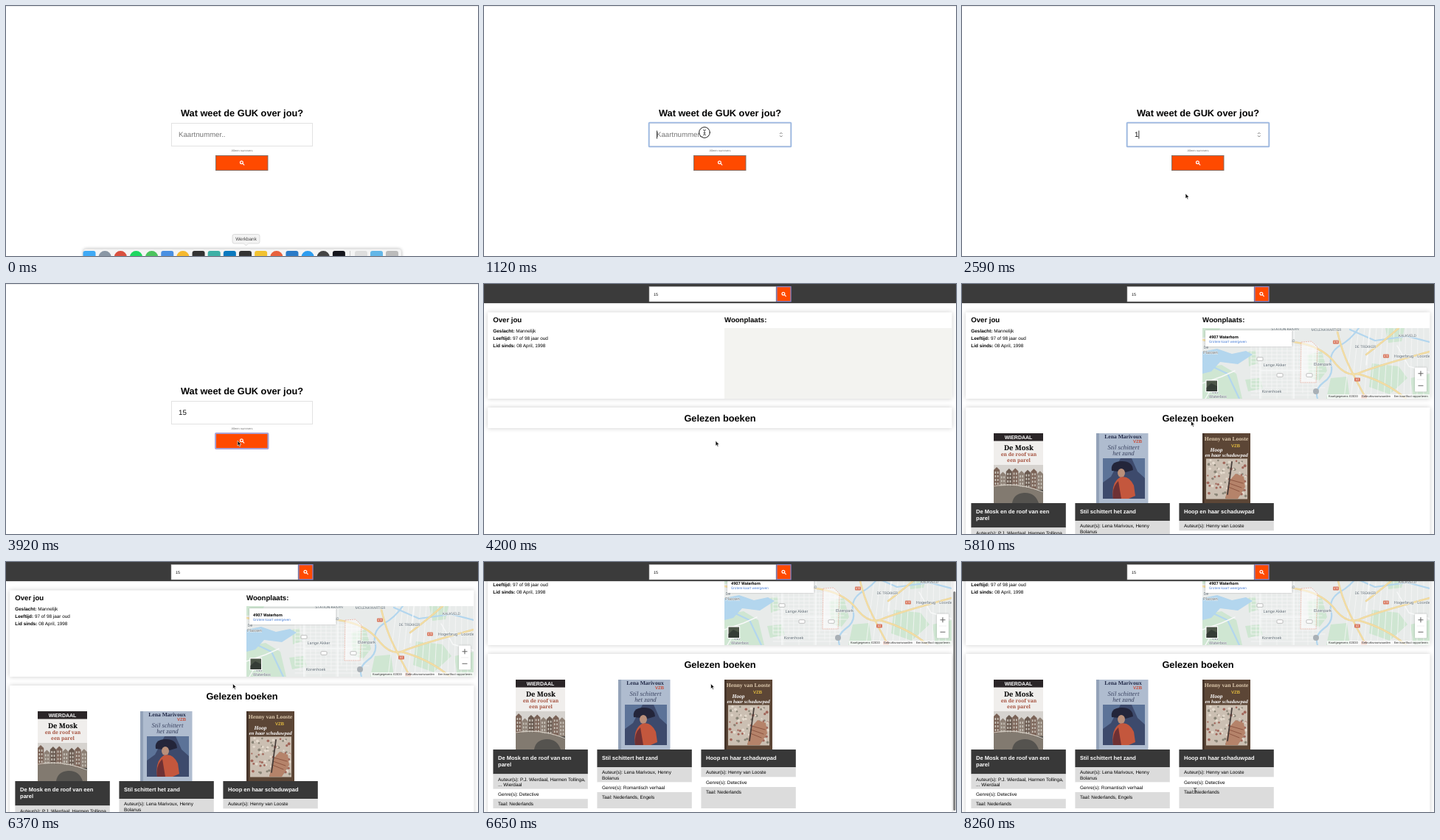
Recreate the animation shown at these times as an HTML page. Size 640 by 340 pixels, loop 8.33 s.

```html
<!DOCTYPE html>
<html lang="nl">
<head>
<meta charset="utf-8">
<title>Wat weet de GUK over jou?</title>
<style>
html, body { margin: 0; height: 100%; overflow: hidden; background: #fff; }
svg { display: block; }
#stage { width: 100vw; height: 100vh; }
text { font: 6.4px "Liberation Sans", Arial, sans-serif; white-space: pre; text-rendering: geometricPrecision; }
.b { font-weight: bold; }
.h1 { font-size: 12.75px; font-weight: bold; text-anchor: middle; }
.h2 { font-size: 9.6px; font-weight: bold; }
.field { font-size: 9.7px; }
.title { font-size: 7.5px; font-weight: bold; fill: #fff; }
.tiny { font-size: 4px; fill: #777; }
.mid { text-anchor: middle; }
.card { fill: #fff; filter: drop-shadow(0 0 3px #0003); }
.cover text { font-family: "Liberation Serif", Times, serif; font-weight: bold; text-anchor: middle; }
.cover .sans { font-family: "Liberation Sans", Arial, sans-serif; }
.cover .slab { font-family: "Noto Serif", serif; }
.cover .slant { font-style: italic; }
.line { fill: none; stroke-linecap: round; stroke-linejoin: round; }
#map text { font-family: Roboto, sans-serif; }
#places text { font-size: 5.6px; fill: #66717a; text-anchor: middle; stroke: #f4f6f5; stroke-width: 1px; paint-order: stroke; }
#places .area { font-size: 5px; }
#places .road { font-size: 3.6px; fill: #fff; stroke: none; }
#map .foot { fill: #333; }
</style>
</head>
<body>
<svg id="stage" viewBox="0 0 640 340">
<defs>
	<g id="lens" class="line" stroke="#fff" stroke-width="1.2"><circle r="1.9" cx="-.6" cy="-.6"/><path d="M.9 .9L2.8 2.8"/></g>
	<path id="motorway" d="M326 76Q360 82 400 79T462 81Q492 88 507 109 521 126 536 122 560 112 634 92M508 60Q514 90 526 114T548 156M536 122Q574 132 602 156M548 96Q574 76 592 60"/>
</defs>
<rect width="640" height="340" fill="#fff"/>

<g id="home">
	<rect width="640" height=".7" fill="#e4e4e4"/>
	<text class="h1" x="320" y="149.7">Wat weet de GUK over jou?</text>
	<rect x="224.5" y="159.5" width="191" height="31" fill="#fff" stroke="#e2e2e2"/>
	<rect id="focus" x="223.6" y="158.6" width="192.8" height="32.8" rx="1" fill="none" stroke="#9db9e3" stroke-width="1.8"/>
	<path id="spinner" class="line" d="M401.3 173.8l1.5-1.6 1.5 1.6M401.3 176.4l1.5 1.6 1.5-1.6" stroke="#666" stroke-width=".8"/>
	<text id="entry" class="field" x="234" y="178.4"></text>
	<rect id="caret" x="234" y="169.5" width=".9" height="11" fill="#222"/>
	<text class="tiny mid" x="320" y="198.2">Alleen nummers</text>
	<rect x="284.5" y="203.5" width="70.5" height="20" fill="#ff4a00" stroke="#7b6a62" stroke-width=".9"/>
	<rect id="pressed" x="284" y="203" width="71.5" height="21" rx="1" fill="none" stroke="#a9a3d6" stroke-width="2"/>
	<use href="#lens" x="320" y="213.3"/>
	<g id="dock">
		<rect x="105" y="330.5" width="431" height="30" rx="4" fill="#f4f4f4" style="filter:drop-shadow(0 0 2px #0005)"/>
		<rect x="466" y="333" width=".7" height="20" fill="#bbb"/>
	</g>
	<g id="tip">
		<path d="M309.5 310.5H341.5Q344 310.5 344 313V320.5Q344 323 341.5 323H328.5L325.5 326 322.5 323H309.5Q307 323 307 320.5V313Q307 310.5 309.5 310.5Z" fill="#f3f3f3" stroke="#cfcfcf" stroke-width=".7"/>
		<text class="mid" x="325.5" y="318.8" fill="#444">Werkbank</text>
	</g>
</g>

<g id="result">
	<g id="page">
		<rect class="card" x="5" y="38.5" width="629.5" height="117.5"/>
		<rect id="shelf" class="card" x="5" y="168" width="629.5" height="28"/>
		<text class="h2" x="12.3" y="52.3">Over jou</text>
		<text x="12.3" y="66"><tspan class="b">Geslacht:</tspan> Mannelijk</text>
		<text x="12.3" y="76.2"><tspan class="b">Leeftijd:</tspan> 97 of 98 jaar oud</text>
		<text x="12.3" y="86.3"><tspan class="b">Lid sinds:</tspan> 08 April, 1998</text>
		<text class="h2" x="326" y="52.3">Woonplaats:</text>
		<text class="h1" x="320" y="186.7">Gelezen boeken</text>

		<svg id="map" x="326" y="60" width="308" height="96" viewBox="326 60 308 96">
			<rect x="326" y="60" width="308" height="96" fill="#f3f3f0"/>
			<g id="tiles">
				<rect x="326" y="60" width="308" height="96" fill="#e8ebea"/>
				<g fill="#cfe6d2">
					<path d="M326 114L352 110 372 122 380 156H326ZM326 60H350L346 70 326 73ZM468 96L488 92 495 118 484 132 469 126ZM388 92L398 90 401 108 389 112Z"/>
					<path d="M556 108L592 112 604 128 580 150 552 140ZM574 60L600 60 596 78 578 80ZM500 128L522 126 526 156H494ZM608 128L634 122V156H612ZM384 130L404 128 408 142 388 146Z"/>
				</g>
				<g id="grid" class="line" stroke="#f6f7f7" stroke-width=".8"/>
				<path d="M326 92L346 88 366 95 385 91 394 96 374 109 350 106 338 119 326 122Z" fill="#b3d6ee"/>
				<path class="line" d="M538 60Q527 76 512 84 498 93 500 108 505 124 490 134 478 143 482 156M326 106L360 122 376 156M526 62L560 77 604 71 634 79" stroke="#b3d6ee" stroke-width="2.2"/>
				<path class="line" d="M326 135L352 126 370 118M404 82V156M450 60V156M404 118H470M330 156L344 132M553 60L548 110M590 84L606 112 634 120" stroke="#f8f9f9" stroke-width="1.4"/>
				<use href="#motorway" class="line" stroke="#e6cd95" stroke-width="2.4"/>
				<use href="#motorway" class="line" stroke="#f5e0a6" stroke-width="1.5"/>
				<path d="M460 79L474 78 482 86 480 134H459Z" fill="#fff8" stroke="#ecaa98" stroke-width=".7" stroke-dasharray="2 1"/>
				<g id="places"></g>
			</g>
			<rect id="thumb" x="331" y="131" width="15.5" height="15.5" fill="#e8ebe8" stroke="#fff"/>
			<g id="controls">
				<rect x="331" y="131" width="15.5" height="15.5" fill="#4c5548" stroke="#fff"/>
				<path d="M331.5 141L338 135 346 139V146H331.5Z" fill="#353c36"/>
				<g fill="#fff" style="filter:drop-shadow(0 .5px 1px #0004)">
					<rect x="330" y="63" width="117.5" height="22"/><rect x="614" y="113.5" width="16" height="33" rx="1"/>
				</g>
				<text class="b" x="335" y="73.5" style="font-size:5.5px">4907 Waterhorn</text>
				<text x="335" y="80" fill="#4a7fd6" style="font-size:4.7px">Grotere kaart weergeven</text>
				<path d="M618.5 121.7H625.5M622 118.2V125.2M618.5 138.3H625.5" stroke="#666" stroke-width="1.1"/>
				<path d="M617 130H627" stroke="#e3e3e3" stroke-width=".6"/>
				<circle cx="480" cy="146" r="4" fill="#a9b0b6"/>
				<rect x="495" y="150" width="139" height="6" fill="#fffb"/>
				<text class="tiny foot" x="497" y="154.3">Kaartgegevens ©2020</text>
				<text class="tiny foot" x="542" y="154.3">Gebruiksvoorwaarden</text>
				<text class="tiny foot" x="586" y="154.3">Een kaartfout rapporteren</text>
			</g>
		</svg>

		<g id="books">
			<g class="cover">
				<rect x="43" y="203" width="67" height="95" fill="#f0eeec"/>
				<rect x="43" y="203" width="67" height="10.5" fill="#2a2527"/>
				<text class="sans" x="76.5" y="210.9" fill="#fff" style="font-size:7px">WIERDAAL</text>
				<text class="slab" x="77" y="225.6" style="font-size:9.4px">De Mosk</text>
				<text class="slab" x="77" y="234" fill="#a5523f" style="font-size:6.7px">en de roof van</text>
				<text class="slab" x="77" y="242" fill="#a5523f" style="font-size:6.7px">een parel</text>
				<rect x="43" y="246" width="67" height="52" fill="#d6d3cf"/>
				<g id="houses"></g>
				<rect x="43" y="280" width="67" height="18" fill="#55534f"/>
				<path d="M43 276Q76 270 110 284V298H104Q99 283 84 284 70 285 68 298H43Z" fill="#827a70"/>
				<path class="line" d="M43 275Q76 269 110 283" stroke="#cfc8be" stroke-width="1.2"/>
			</g>
			<g class="cover">
				<rect x="182" y="203" width="70.5" height="95" fill="#afbccf"/>
				<rect x="182" y="203" width="4" height="95" fill="#93a2b8"/>
				<text x="218.5" y="210.2" fill="#222a48" style="font-size:7.6px">Lena Marivoux</text>
				<text class="sans" x="238" y="216.3" fill="#c9503c" style="font-size:6px">VZB</text>
				<g fill="#3a4360" style="font-size:8.8px">
					<text class="slant" x="219" y="225" style="font-size:8.8px;font-weight:normal">Stil schittert</text>
					<text class="slant" x="219" y="233.2" style="font-size:8.8px;font-weight:normal">het zand</text>
				</g>
				<rect x="191" y="237" width="57" height="55" fill="#3d4a6c"/>
				<path d="M191 237H215L202 262 191 270ZM230 237H248V264L238 255Z" fill="#5c7398"/>
				<path d="M203 254Q201 242 215 241 231 240 232 253L222 256Z" fill="#23253a"/>
				<ellipse cx="216" cy="257" rx="5" ry="6" fill="#b98f7a"/>
				<path d="M205 292Q202 270 214 263 226 259 233 274L235 288 226 292Z" fill="#c4573d"/>
				<path d="M205 292Q203 276 212 268L216 292Z" fill="#6e3134"/>
			</g>
			<g class="cover">
				<rect x="326" y="203" width="65" height="95" fill="#5c4636"/>
				<rect x="326" y="203" width="3" height="95" fill="#46352a"/>
				<text x="358.5" y="212.7" fill="#ddc9ad" style="font-size:7.7px">Henny van Looste</text>
				<text class="sans" x="371" y="222" fill="#dfb83f" style="font-size:6px">VZB</text>
				<text class="slant" x="345" y="227.5" fill="#fff" style="font-size:7.5px">Hoop</text>
				<text class="slant" x="358.5" y="234.5" fill="#fff" style="font-size:6.8px">en haar schaduwpad</text>
				<rect x="331" y="237.5" width="56" height="55" fill="#cbbfb2"/>
				<g id="petals"></g>
				<path d="M357 292L362 268 371 258 382 262 384 276 374 292Z" fill="#b5836a"/>
				<path class="line" d="M363 266L381 271M362 271L379 277M361 276L376 282" stroke="#8d5642"/>
				<path class="line" d="M366 242L360 286" stroke="#473d3a" stroke-width="1.8"/>
			</g>
		</g>
	</g>

	<rect id="bar" x="636.3" y="40" width="3" height="298" rx="1.5" fill="#7d7d7d"/>
	<g id="header">
		<rect width="640" height="26" fill="#3b3b3b" style="filter:drop-shadow(0 .5px 1px #0004)"/>
		<rect x="224" y="3.5" width="172" height="20.5" fill="#fff" stroke="#aaa" stroke-width=".6"/>
		<text x="230" y="15.8" style="font-size:5.3px">15</text>
		<rect x="397" y="3.7" width="19" height="20" fill="#ff4a00" stroke="#8b83c6" stroke-width="1.3"/>
		<use href="#lens" x="406.5" y="13.8"/>
	</g>
</g>

<path id="arrow" d="M0 0V7L1.6 5.5 2.7 8 3.9 7.5 2.8 5H5Z" fill="#111" stroke="#fff" stroke-width=".6"/>
<g id="beam" class="line" stroke="#333" stroke-width=".8">
	<circle id="halo" r="7.3" stroke="#222" stroke-width="1"/>
	<path d="M-1.6 -3.5Q0 -3.5 0 -2.5 0 -3.5 1.6 -3.5M0 -2.5V2.5M-1.6 3.5Q0 3.5 0 2.5 0 3.5 1.6 3.5M-1 .6H1"/>
</g>
</svg>
<script>
const LOOP = 8330;
const $ = id => document.getElementById(id);
const add = (parent, name, attrs, label = "") => {
	const node = document.createElementNS("http://www.w3.org/2000/svg", name);
	for (const key in attrs) node.setAttribute(key, attrs[key]);
	node.textContent = label;
	return parent.appendChild(node);
};
const show = (id, visible) => $(id).setAttribute("opacity", +visible);
const move = (id, x, y) => $(id).setAttribute("transform", `translate(${x} ${y})`);
let seed = 7;
const random = () => (seed = seed * 16807 % 2147483647) / 2147483647;

// Dock icons: "o" is round, "s" is square
const icons = "s3fa9f5 o8a97a5 od9503f o1ed760 o4cc35e s4a90e2 of5b82e s333333 s3eb0a6 s0a79bf s333333 sf2c230 oe8603c s2a7bc8 o2d9df0 o444444 s15151c sdddddd s63b7e8 sbbbbbb";
icons.split(" ").forEach((icon, i) => add($("dock"), "rect", {
	x: i < 17 ? 104.5 + i * 21.15 : 473 + (i - 17) * 21, y: 333, width: 17, height: 17,
	rx: icon[0] == "o" ? 8.5 : 3, fill: "#" + icon.slice(1)
}));

// Map streets and labels
for (let i = 0; i < 14; i++) {
	add($("grid"), "path", { d: `M${392 + i * 7} 84V${140 + i % 3 * 8}M392 ${86 + i * 5}H${480 + i % 4 * 4}` });
	add($("grid"), "path", { d: `M${530 + i * 8} 60L${518 + i * 9} 156` });
}
const places = [
	["STATION KRAAN", 438, 63, 1], ["HOFRAND", 440, 79, 1], ["MOLENKWARTIER", 494, 64, 1], ["KALKVELD", 604, 72, 1],
	["DE TREKKER", 547, 87, 1], ["Hogerbrug", 599, 100], ["Loorde", 626, 100], ["Lange Akker", 424, 112],
	["Elzenpark", 489, 111], ["Korenhoek", 420, 148], ["De", 331, 88], ["Plassen", 337, 95], ["Het", 343, 149], ["Waterbos", 347, 155]
];
for (const [name, x, y, area] of places) add($("places"), "text", { x, y, class: area ? "area" : "" }, name);
for (const [name, x, y] of [["A4", 357, 76], ["A10", 507, 79], ["A10", 575, 98], ["A2", 536, 130], ["A2", 545, 153]]) {
	add($("places"), "rect", { x: x - 4, y: y - 2.5, width: 8, height: 5, rx: 1, fill: "#d9785f" });
	add($("places"), "text", { x, y: y + 1.4, class: "road" }, name);
}
for (const [x, y] of [[404, 102], [431, 124], [471, 124]])
	add($("places"), "rect", { x: x - 4, y: y - 2.3, width: 8, height: 4.6, rx: 1, fill: "#fff", stroke: "#999", "stroke-width": .6 });

// Cover pictures
for (let i = 0; i < 8; i++) {
	const x = 43 + i * 8.4, y = 249 + random() * 7;
	add($("houses"), "path", { d: `M${x} 282V${y + 4}L${x + 4} ${y}L${x + 8.2} ${y + 4}V282Z`, fill: ["#7a6256", "#8d8075", "#6a5a50"][i % 3] });
	for (let j = 0; j < 8; j++)
		add($("houses"), "rect", { x: x + 1.5 + j % 2 * 3.3, y: y + 6 + (j >> 1) * 5, width: 1.7, height: 3, fill: "#c9c3ba" });
}
for (let i = 0; i < 90; i++)
	add($("petals"), "circle", { cx: 333 + random() * 52, cy: 239.5 + random() * 51, r: 1 + random(), fill: ["#a1665a", "#8a8577", "#e4dacd"][i % 3] });

// Book details
const books = [
	[12.4, ["De Mosk en de roof van een", "parel"], ["Auteur(s): P.J. Wierdaal, Harmen Tollinga,", "... Wierdaal"], "Genre(s): Detective", "Taal: Nederlands"],
	[153.4, ["Stil schittert het zand"], ["Auteur(s): Lena Marivoux, Henny", "Bolanus"], "Genre(s): Romantisch verhaal", "Taal: Nederlands, Engels"],
	[294.4, ["Hoop en haar schaduwpad"], ["Auteur(s): Henny van Looste"], "Genre(s): Detective", "Taal: Nederlands"]
];
for (const [x, title, ...rows] of books) {
	let y = 298;
	const block = (lines, height, fill, first, step, cls) => {
		add($("books"), "rect", { x, y, width: 128.4, height, fill });
		lines.forEach((line, i) => add($("books"), "text", { x: x + 6.7, y: y + first + i * step, class: cls }, line));
		y += height;
	};
	block(title, 15 + title.length * 9.2, "#383838", 14.3, 8.8, "title");
	rows.forEach((row, i) => {
		const lines = [].concat(row);
		block(lines, i == 2 ? 378 - y : 6.4 + lines.length * 7, i == 1 ? "#fff" : "#dcdcdc", 9.1, 7.2, "");
	});
}

// Pointer stops: time, x, y
const path = [
	[0, 325, 346], [70, 325, 340], [560, 306, 167], [700, 305, 166], [840, 299, 172], [1120, 299, 172], [1330, 303, 255],
	[2590, 303, 255], [2870, 312, 216], [3150, 312, 214], [3570, 314, 213], [4550, 314, 213.5], [4690, 314.5, 214],
	[5390, 314.5, 214], [6160, 307.5, 165.5], [7070, 307.5, 165.5], [8190, 316, 311], [LOOP, 316, 311]
];
const ease = p => p * p * (3 - 2 * p);
const ramp = (t, from, to) => Math.min(1, Math.max(0, (t - from) / (to - from)));
function pointer(t) {
	const i = path.findIndex(stop => stop[0] > t);
	const [t0, x0, y0] = path[i - 1], [t1, x1, y1] = path[i];
	const p = ease((t - t0) / (t1 - t0));
	return [x0 + (x1 - x0) * p, y0 + (y1 - y0) * p];
}

function draw(t) {
	const home = t < 4060;
	show("home", home);
	show("result", !home);

	const [x, y] = pointer(t);
	const inField = home && y > 159 && y < 191;
	const beam = inField || (!home && y > 305);
	move("arrow", x, y);
	move("beam", x, y);
	show("arrow", !beam);
	show("beam", beam);
	show("halo", inField);

	const focused = t >= 1050 && t < 3710;
	const typed = t < 2590 ? "" : t < 2730 ? "1" : "15";
	$("entry").textContent = typed || "Kaartnummer..";
	$("entry").setAttribute("fill", typed ? "#111" : "#777");
	$("caret").setAttribute("x", 234 + typed.length * 5.4);
	show("caret", focused && (t < 1680 || (t >= 2170 && t < 3150)));
	show("focus", focused);
	show("spinner", focused || inField);
	show("pressed", t >= 3710);
	move("dock", 0, 30 * ease(ramp(t, 70, 490)));
	show("tip", 1 - ramp(t, 70, 350));

	const loaded = t >= 5390;
	show("tiles", loaded ? 1 : t >= 5250 ? .8 : 0);
	show("thumb", t >= 4970);
	show("controls", loaded);
	show("books", loaded);
	$("shelf").setAttribute("height", loaded ? 217 : 28);
	const scroll = 43 * (1 - (1 - ramp(t, 6390, 6640)) ** 2);
	move("page", 0, -scroll);
	$("bar").setAttribute("y", 4 + scroll * .84);
	show("bar", t >= 6400 ? 1 - ramp(t, 7000, 7350) : 0);
}

function tick(now) {
	draw(now % LOOP);
	requestAnimationFrame(tick);
}
draw(0);
requestAnimationFrame(tick);
</script>
</body>
</html>
```
